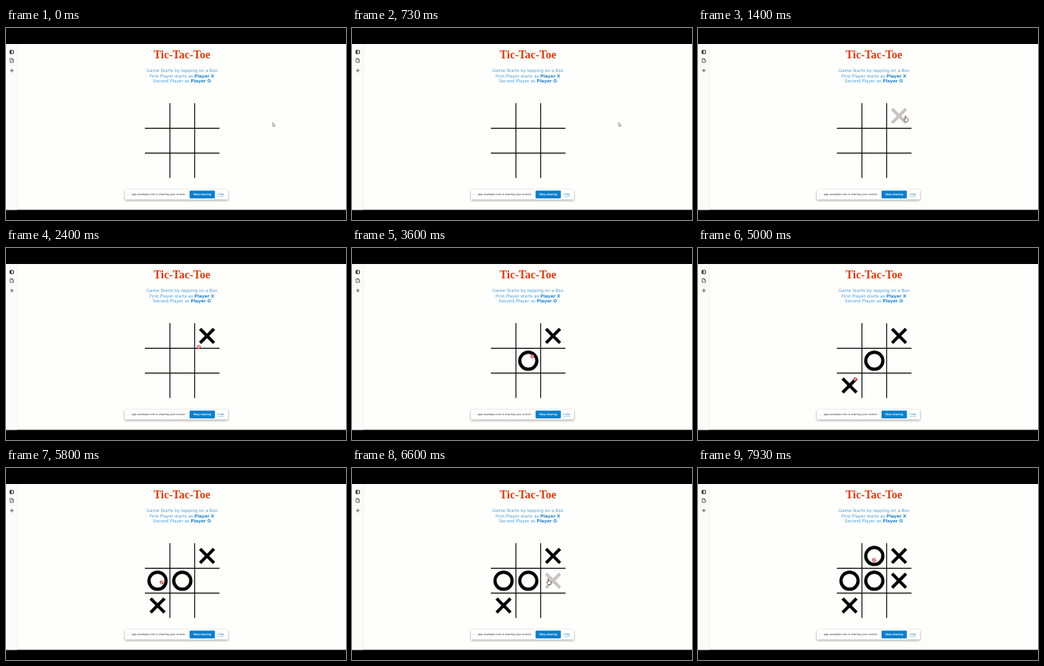
An HTML page for the animation above (8000 ms loop, 426x240 px).

```html
<!DOCTYPE html>
<html lang="en">
<head>
<meta charset="utf-8">
<title>Tic-Tac-Toe</title>
<style>
  html, body { margin: 0; width: 100%; height: 100%; overflow: hidden; background: #000; }
  svg { display: block; width: 100vw; height: 100vh; }
  .title { font: bold 14px "Liberation Serif", serif; fill: #d63a0b; text-anchor: middle; }
  .intro { font: 5.35px "DejaVu Sans", sans-serif; fill: #4b9ed8; text-anchor: middle; }
  .intro .name { font-weight: bold; fill: #2585cb; }
  .share { font: 3.3px "DejaVu Sans", sans-serif; fill: #222; }
  .bar { filter: drop-shadow(0 1.3px 1.6px #0006); }
  .line { fill: none; stroke: #222; stroke-width: .9; }
  .grid { stroke: #111; stroke-width: 1.15; }
  .mark { fill: none; stroke: #000; stroke-width: 4; }
  .ghost { stroke: #c8c4c0; }
</style>
</head>
<body>
<svg viewBox="0 0 426 240" preserveAspectRatio="none">
  <defs>
    <path id="X" d="M-8.7-8.7 8.7 8.7M8.7-8.7-8.7 8.7"/>
    <circle id="O" r="10.7"/>
  </defs>
  <rect width="426" height="240"/>
  <rect y="20" width="426" height="207.3" fill="#fefefd"/>
  <rect y="20" width="14" height="207.3" fill="#fbfbf9"/>
  <path d="M14.5 20V227" stroke="#eeeee6" stroke-width=".7"/>
  <path d="M2 46.5H12" stroke="#eeeed8" stroke-width=".6"/>
  <g class="line">
    <rect x="5" y="28" width="4.5" height="4" rx=".5"/>
    <path d="M5.8 28V32" stroke-width="1.6"/>
    <path d="M5.2 38.2H7.7L9.3 39.8V43H5.2ZM7.6 38.3V40H9.2" stroke-width=".65"/>
    <path d="M5 53.2H9.6M7.3 50.9V55.5" stroke-width=".65"/>
  </g>

  <text class="title" x="220.5" y="38.4">Tic-Tac-Toe</text>
  <g class="intro">
    <text x="220.5" y="55">Game Starts by tapping on a Box</text>
    <text x="220.5" y="61.5">First Player starts as <tspan class="name">Player X</tspan></text>
    <text x="220.5" y="68">Second Player as <tspan class="name">Player O</tspan></text>
  </g>

  <path class="grid" d="M205.4 94V187.5M236.4 94V187.5M174 125.4H267.5M174 156.4H267.5"/>
  <g id="marks"></g>

  <g class="share">
    <rect class="bar" x="149" y="202" width="129" height="12.5" rx="1" fill="#fff"/>
    <path d="M152.5 207V210M154 207.5V209.5" stroke="#ddd" stroke-width=".5"/>
    <text x="157.5" y="209.3">app.example.com is sharing your screen</text>
    <rect x="230" y="203.3" width="31.7" height="9.7" rx="1" fill="#0b7fcb"/>
    <text x="245.8" y="209.3" text-anchor="middle" font-weight="bold" style="font-size:3.1px;fill:#fff">Stop sharing</text>
    <text x="265.3" y="209.3" text-decoration="underline" style="font-size:3.5px;fill:#2585cb">Hide</text>
  </g>

  <g id="cursor">
    <path id="arrow" d="M0 0V4.6L1.1 3.7 1.9 5.3 2.6 5 1.9 3.4H3.3Z" fill="#fff" stroke="#665" stroke-width=".55"/>
    <path id="hand" d="M-.6 .2Q0-.5.5.2V2.6L3 3.2Q3.6 3.5 3.4 4.6L2.8 7H-.6L-2.4 4.2Q-2.2 3.3-.6 4.4Z" fill="#fff" stroke="#222" stroke-width=".6"/>
    <g id="blocked" fill="#fff" stroke="#c8232b" stroke-width=".9">
      <circle r="2"/><path d="M-1.4-1.4 1.4 1.4"/>
    </g>
  </g>
</svg>
<script>
const LOOP = 8000, CELL = 31, LEFT = 174.4, TOP = 94.4;
const TRAVEL = 400, HOVER = 300; // ms spent moving to a box, then waiting before the click
const REST = { x: 334, y: 118 };
const byId = id => document.getElementById(id);

function cellAt({ x, y }) {
  const col = Math.floor((x - LEFT) / CELL), row = Math.floor((y - TOP) / CELL);
  const inside = Math.min(col, row) >= 0 && Math.max(col, row) < 3;
  return inside ? row * 3 + col : -1;
}

// Players alternate, X first; each click claims the box under the pointer.
const clicks = [
  { time: 1700, x: 260, y: 110 },
  { time: 2890, x: 226, y: 135.5 },
  { time: 4400, x: 197, y: 164 },
  { time: 5700, x: 195, y: 143 },
  { time: 6900, x: 246, y: 138.5 },
  { time: 7800, x: 220.5, y: 115 }
];

function pointerAt(t) {
  return clicks.reduce((from, to) => {
    const start = to.time - HOVER - TRAVEL;
    const p = Math.min(1, Math.max(0, (t - start) / TRAVEL));
    const ease = p * p * (3 - 2 * p);
    return { x: from.x + (to.x - from.x) * ease, y: from.y + (to.y - from.y) * ease };
  }, REST);
}

function mark(turn, cell, style = "") {
  const x = LEFT + CELL * (cell % 3 + .5), y = TOP + CELL * (Math.floor(cell / 3) + .5);
  return `<use href="#${"XO"[turn % 2]}" class="mark ${style}" transform="translate(${x} ${y})"/>`;
}

function draw() {
  const t = (performance.now() - start) % LOOP;
  const pointer = pointerAt(t), hovered = cellAt(pointer);
  const played = clicks.filter(click => click.time <= t).map(cellAt);
  const taken = played.includes(hovered);
  const free = hovered >= 0 && !taken;

  let content = played.map((cell, turn) => mark(turn, cell)).join("");
  if (free) content += mark(played.length, hovered, "ghost");
  byId("marks").innerHTML = content;

  const shape = free ? "hand" : taken ? "blocked" : "arrow";
  for (const id of ["arrow", "hand", "blocked"])
    byId(id).style.display = id === shape ? "" : "none";
  byId("cursor").setAttribute("transform", `translate(${pointer.x} ${pointer.y})`);
  requestAnimationFrame(draw);
}

const start = performance.now();
draw();
</script>
</body>
</html>
```
